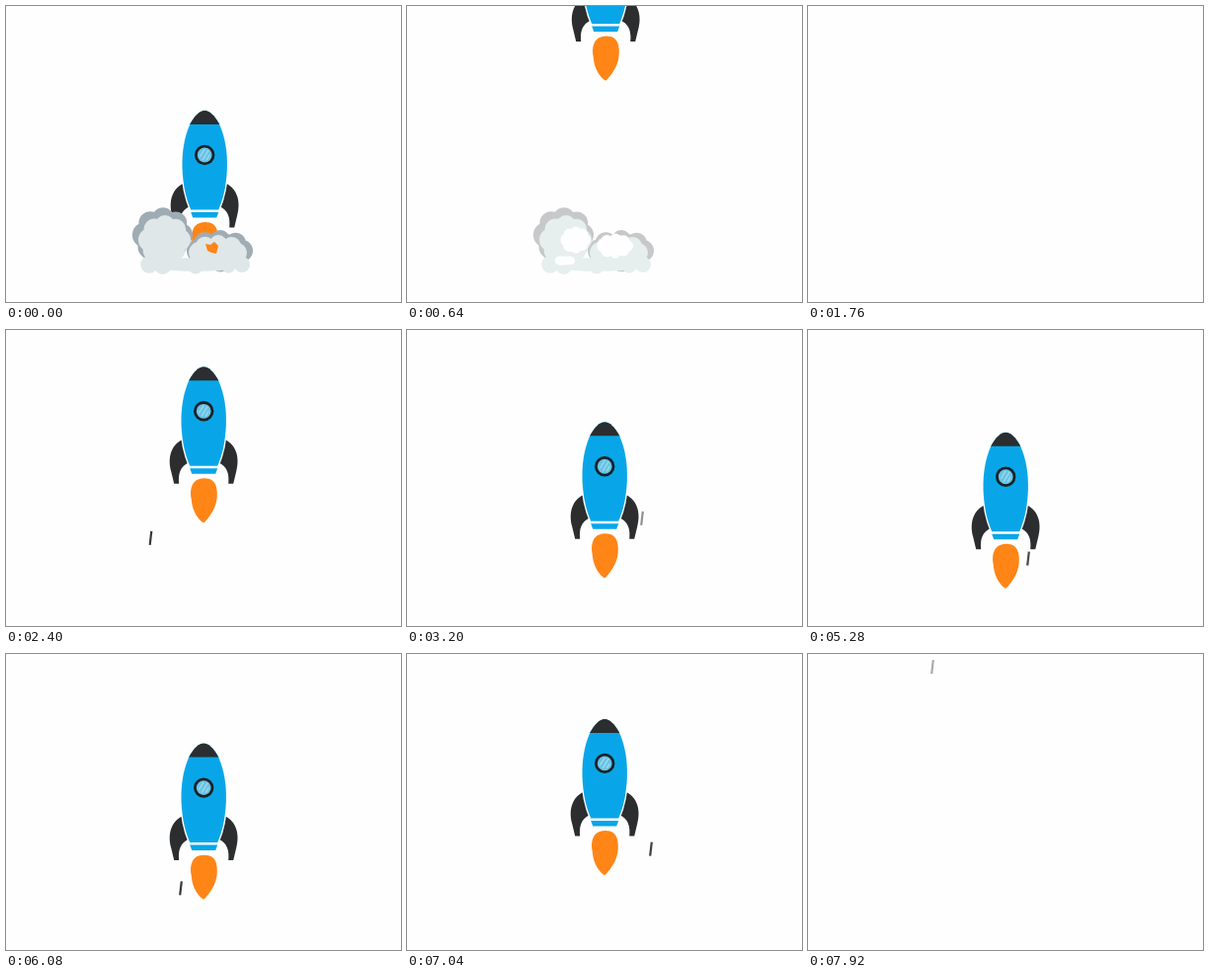
Write an HTML page with a canvas that moves like this. It is 400x300 px and loops after 8 s.

```html
<!DOCTYPE html>
<html lang="en">
<head>
<meta charset="utf-8">
<title>Rocket</title>
<style>
html, body { margin: 0; width: 100%; height: 100%; overflow: hidden; background: #fefefe; }
canvas { display: block; }
</style>
</head>
<body>
<canvas id="stage" width="400" height="300"></canvas>
<script>
const ctx = document.getElementById('stage').getContext('2d');
const LOOP = 8000, TAU = Math.PI * 2;
const PAPER = '#fefefe', DARK = '#2b2d2f', BLUE = '#08a6e8', ORANGE = '#ff8517';
const LAUNCH_END = 800, ARRIVE = 1760, SETTLED = 2697, LEAVE = 6960, GONE = 7440;

// Rocket shapes, relative to the tip of the nose
const body = new Path2D('M0 0C5 0 10 5 15 14C21 28 23 42 22.7 58C22 76 19 89 14 100.5H-14C-19 89 -22 76 -22.7 58C-23 42 -21 28 -15 14C-10 5 -5 0 0 0Z');
const nose = new Path2D('M-20 0H20V14H-20Z');
const fin = new Path2D('M-22 74C-32 79 -37 91 -33 106L-30 118.5H-25C-26 109 -24 101 -15 97Z');
const collar = new Path2D('M-14 103H14L12 108.5H-12Z');
const flame = new Path2D('M-5 114C-1 112.500 5 112.500 9 115.500C13 119 14 125 13.500 132C13 142 7 151 1.500 157Q0 159 -2 157C-8 152 -12 143 -12.500 134C-14.500 125 -12 116 -5 114Z');
const spark = new Path2D('M202 241L207 242L211 239L215 243L213 251L208 250L204 248Z');

function fillPath(path, color) {
  ctx.fillStyle = color;
  ctx.fill(path);
}

function disc(x, y, r, color) {
  const path = new Path2D();
  path.arc(x, y, r, 0, TAU);
  fillPath(path, color);
}

// A filled ellipse with a rim of uneven round puffs
function puff(color, cx, cy, rx, ry, r) {
  const path = new Path2D();
  path.ellipse(cx, cy, rx + r * .5, ry + r * .6, 0, 0, TAU);
  for (let i = 0; i < 8; i++) {
    const a = i / 8 * TAU, size = r * (1 + .1 * Math.sin(i * 5));
    const x = cx + Math.cos(a) * rx, y = cy + Math.sin(a) * ry;
    path.moveTo(x + size, y);
    path.arc(x, y, size, 0, TAU);
  }
  fillPath(path, color);
}

function rocketY(t) {
  if (t < ARRIVE) return 106 - 188 * (t / 640) ** 2;
  const hover = 96 + 13.2 * Math.sin((t - 3360) / 4800 * TAU);
  const arriving = Math.max(0, (SETTLED - t) / 297) ** 1.5;
  const leaving = Math.max(0, (t - LEAVE) / (GONE - LEAVE)) ** 1.5;
  return hover - 46.4 * arriving - 245 * leaving;
}

function drawWindow() {
  disc(0, 45, 10.2, '#1b2227');
  disc(0, 45, 7.4, '#67c4e8');
  ctx.strokeStyle = '#a6d9e8';
  ctx.lineWidth = 1.2;
  ctx.stroke(new Path2D('M-5 47L0 39M-2 50L4 40M2 50L5 45'));
}

function drawRocket(t) {
  ctx.save();
  ctx.translate(t < ARRIVE ? 201.2 : 200.2, rocketY(t));
  fillPath(flame, ORANGE);
  for (let side = 0; side < 2; side++) {
    fillPath(fin, DARK);
    ctx.scale(-1, 1);
  }
  ctx.strokeStyle = PAPER;
  ctx.lineWidth = 3;
  ctx.stroke(body);
  fillPath(body, BLUE);
  fillPath(collar, BLUE);
  ctx.clip(body);
  fillPath(nose, DARK);
  drawWindow();
  ctx.restore();
}

function drawSmoke(t) {
  const [shade, light] = t < 300 ? ['#a0acb4', '#dfe7e8'] : ['#c6c8c9', '#e6eeee'];
  ctx.globalAlpha = Math.min(1, (960 - t) / 240);
  puff(shade, 159, 232, 18, 17, 12);
  puff(shade, 217, 248, 22, 11, 11);
  puff(light, 161, 237, 15, 15, 11);
  puff(light, 215, 250, 19, 9, 10);
  puff(light, 192, 262, 47, 2, 8);
  if (t < 120) fillPath(spark, ORANGE);

  // Gaps open up as the cloud thins out
  const gap = Math.max(0, (t - 160) / 480);
  puff(PAPER, 171, 237, 9 * gap, 8 * gap, 6 * gap);
  puff(PAPER, 211, 243, 12 * gap, 7 * gap, 6 * gap);
  puff(PAPER, 160, 258, 6 * gap, gap, 4 * gap);
  ctx.globalAlpha = 1;
}

// One speed line starts every 250 ms, falls past the rocket and disappears
function drawStreaks(t) {
  const lanes = [247, 146, 223, 238, 126, 177, 176, 247, 146.5];
  const gap = 250, first = 155, life = 260;
  const k = Math.floor((t - first) / gap);
  for (const n of [k - 1, k]) {
    const start = first + n * gap, age = t - start;
    if (start < 1700 || age > life) continue;
    const x = lanes[n % lanes.length];
    const y = Math.max(rocketY(t), -73) + 73 + age * .38;
    ctx.strokeStyle = `rgba(28,28,30,${Math.min(.88, .3 + age / 250)})`;
    ctx.lineWidth = 2.2;
    ctx.beginPath();
    ctx.moveTo(x + .8, y);
    ctx.lineTo(x - .8, y + 14);
    ctx.stroke();
  }
}

function draw(t) {
  ctx.fillStyle = PAPER;
  ctx.fillRect(0, 0, 400, 300);
  if (t < LAUNCH_END || (t > ARRIVE && t < GONE)) drawRocket(t);
  if (t < 960) drawSmoke(t);
  drawStreaks(t);
}

const begin = performance.now();
function tick() {
  draw((performance.now() - begin) % LOOP);
  requestAnimationFrame(tick);
}
tick();
</script>
</body>
</html>
```
